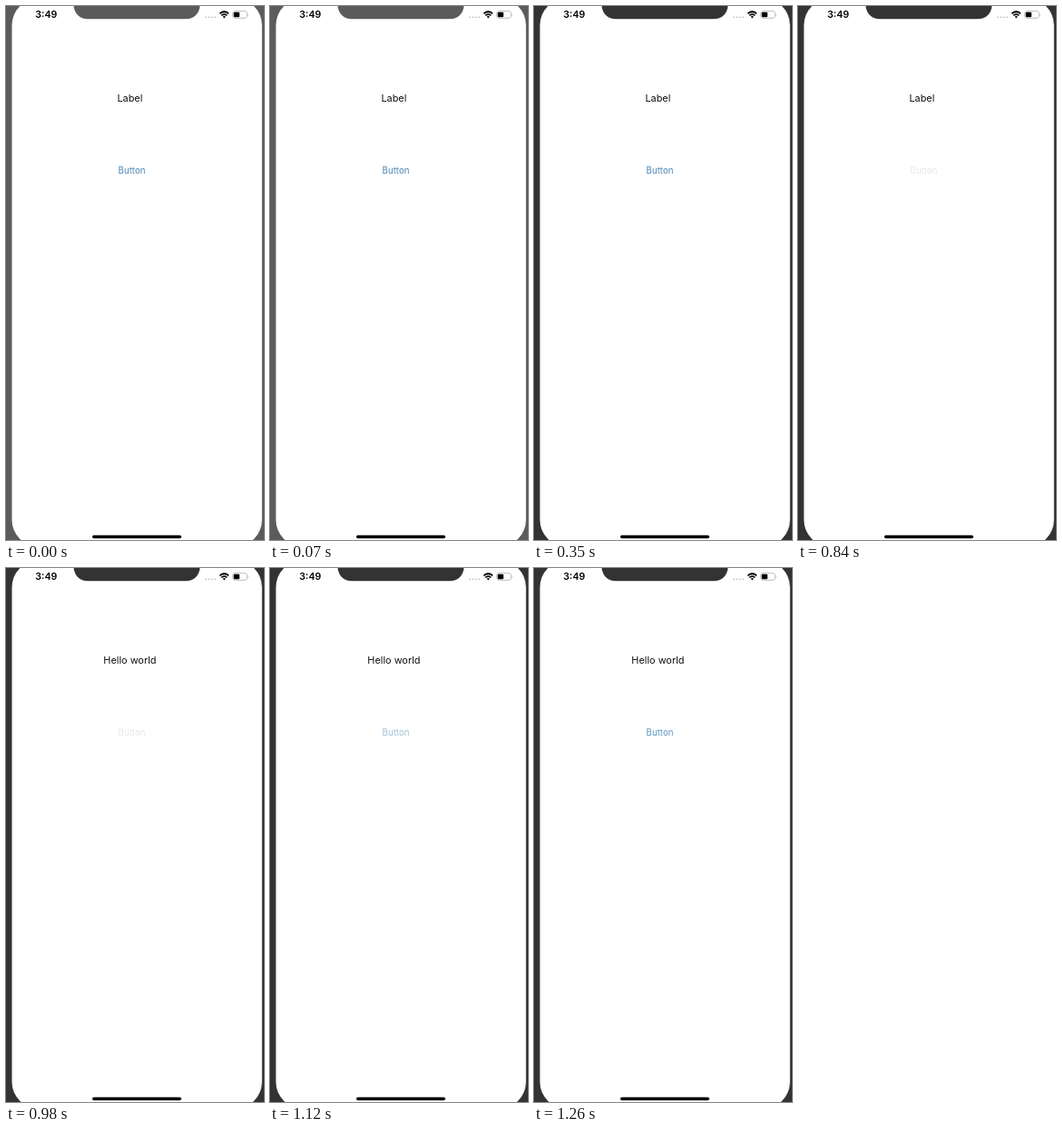
These frames come from a looping animation (284x586 px, 2.38 s). An HTML page:

```html
<!DOCTYPE html>
<html lang="en">
<head>
<meta charset="utf-8">
<title>Label and button</title>
<style>
html, body { margin: 0; width: 100%; height: 100%; overflow: hidden; background: #333; }
svg { display: block; width: 100vw; height: 100vh; }
text { font-family: Inter, Roboto, sans-serif; text-anchor: middle; }
</style>
</head>
<body>
<svg viewBox="0 0 284 586">
  <rect class="case" width="284" height="586"/>
  <rect x="6.5" y="-8" width="275.3" height="601" rx="29" fill="#fff"/>
  <path class="case" d="M74.5 -1V0C75.5 8.5 81 14.3 90 14.3H198C207 14.3 212.500 8.500 213.500 0V-1Z"/>
  <text x="44.300" y="13.300" font-size="10.600" font-weight="600">3:49</text>
  <g fill="#bcbcbc">
    <circle cx="220" cy="12.300" r=".9"/>
    <circle cx="223.500" cy="12.300" r=".9"/>
    <circle cx="227" cy="12.300" r=".9"/>
    <circle cx="230.400" cy="12.300" r=".9"/>
  </g>
  <g fill="none" stroke="#000" stroke-width="1.700">
    <path d="M235.300 8.300Q240.200 4.200 245.100 8.300"/>
    <path d="M237.100 10.400Q240.200 7.800 243.300 10.400"/>
  </g>
  <path d="M238.600 11.700Q240.200 10.400 241.800 11.700L240.200 13.400Z"/>
  <rect x="249.700" y="5.700" width="15.600" height="7.600" rx="2.200" fill="none" stroke="#aaa" stroke-width=".8"/>
  <rect x="250.700" y="6.700" width="6.300" height="5.600" rx="1"/>
  <path d="M266.300 8.200Q268 9.500 266.300 10.800Z" fill="#aaa"/>
  <text id="label" x="136.400" y="105.200" font-size="10.900" fill="#111"></text>
  <text id="button" x="138.500" y="184.200" font-size="9.700"></text>
  <rect x="95" y="580.800" width="98" height="3.400" rx="1.700"/>
</svg>
<script>
const LOOP = 2380, STEP = 70;
const PRESS = 840, SWAP = 980, DONE = 1260;
const pale = [231, 232, 234], blue = [90, 151, 190], idle = [76, 134, 184];
const label = document.getElementById('label');
const button = document.getElementById('button');
const cases = document.querySelectorAll('.case');
button.textContent = 'Button';

const mix = (a, b, k) => a.map((v, i) => v + (b[i] - v) * k);

function buttonColor(t) {
  if (t < PRESS) return idle;
  const step = Math.floor((t - SWAP) / STEP) * STEP;
  const k = Math.min(1, Math.max(0, step / (DONE - SWAP)));
  return mix(pale, blue, k);
}

function draw(t) {
  const shade = t < 350 ? '#5b5b5b' : '#333';
  cases.forEach(el => el.setAttribute('fill', shade));
  label.textContent = t < SWAP ? 'Label' : 'Hello world';
  button.setAttribute('fill', `rgb(${buttonColor(t).map(Math.round)})`);
}

const start = performance.now();
function tick() {
  draw((performance.now() - start) % LOOP);
  requestAnimationFrame(tick);
}
tick();
</script>
</body>
</html>
```
